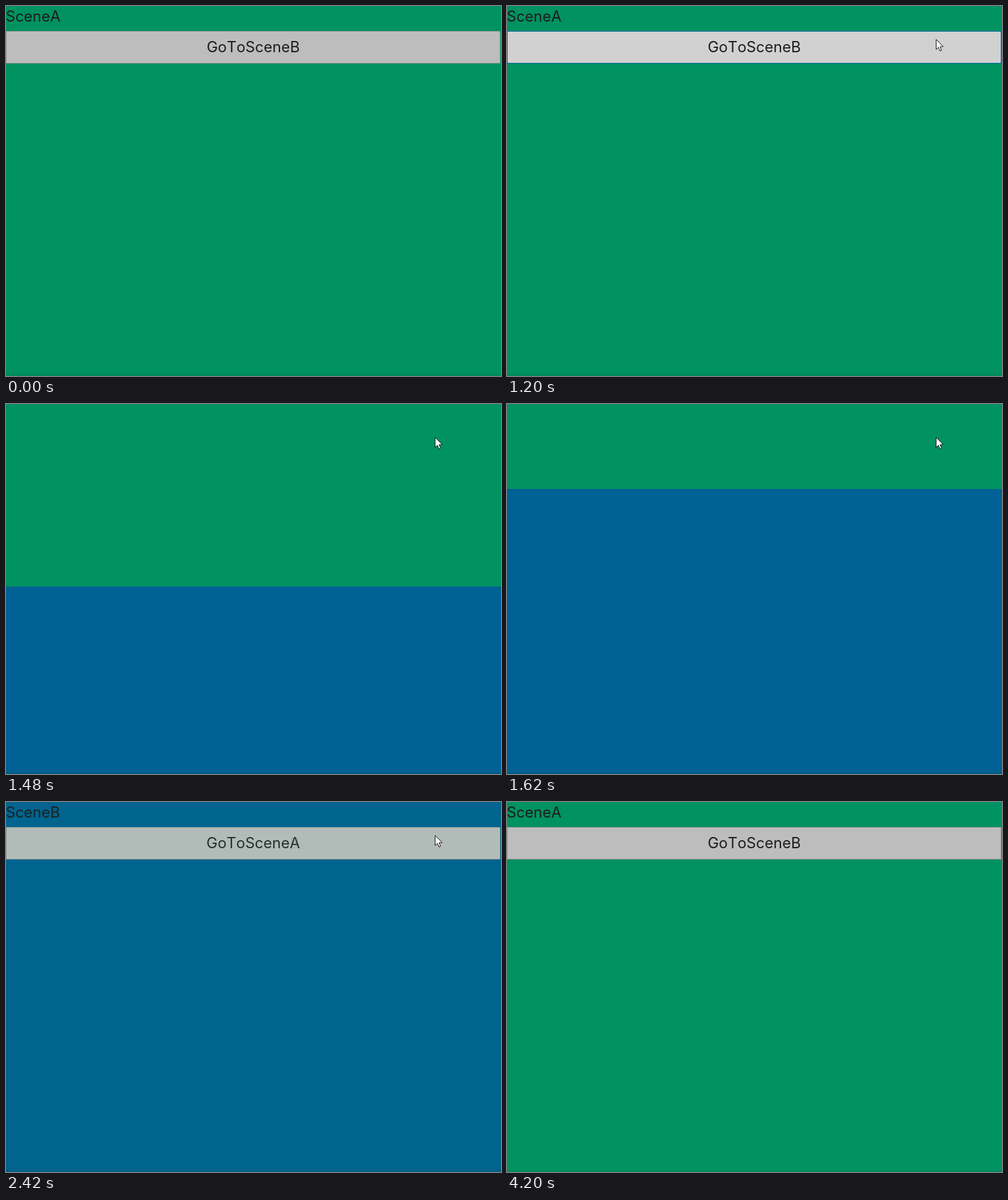
An HTML page with a canvas for the animation above (4.53 s loop, 793 by 592 pixels).

```html
<!DOCTYPE html>
<html lang="en">
<head>
<meta charset="utf-8">
<title>Scene transitions</title>
<style>
  html, body { margin: 0; width: 100%; height: 100%; overflow: hidden; }
  canvas { display: block; }
</style>
</head>
<body>
<canvas id="stage" width="793" height="592"></canvas>
<script>
const W = 793, H = 592, LOOP = 4530, STEP = 70;
const ctx = document.getElementById('stage').getContext('2d');

const scenes = {
  A: { color: '#009260', title: 'SceneA', action: 'GoToSceneB' },
  B: { color: '#006194', title: 'SceneB', action: 'GoToSceneA' }
};
const buttonStyles = {
  idle: ['#bdbdbd', '#929292'],
  hover: ['#d1d1d1', '#777777'],
  pressed: ['#d1d1d1', '#00659c']
};

// Motion advances in discrete steps; returns how many have begun since start.
const steps = (t, start) => Math.floor((t - start) / STEP);
const mix = (a, b, p) => a + (b - a) * p;

function label(text, x, y, align) {
  ctx.font = '24px Inter, sans-serif';
  ctx.fontKerning = 'none';
  ctx.textAlign = align;
  ctx.fillStyle = '#1c1c1c';
  ctx.fillText(text, x, y);
}

function drawScene(name, state, y = 0, alpha = 1) {
  const { color, title, action } = scenes[name];
  const [fill, border] = buttonStyles[state];
  ctx.save();
  ctx.globalAlpha = alpha;
  ctx.translate(0, y);
  ctx.fillStyle = color;
  ctx.fillRect(0, 0, W, H);
  label(title, -0.5, 25, 'left');
  ctx.fillStyle = fill;
  ctx.fillRect(0, 40, 792, 52);
  ctx.strokeStyle = border;
  ctx.lineWidth = 1;
  ctx.strokeRect(0.5, 40.5, 791, 51);
  label(action, 396, 74, 'center');
  ctx.restore();
}

function drawCursor([x, y]) {
  ctx.save();
  ctx.translate(Math.round(x) + 0.5, Math.round(y) + 0.5);
  ctx.beginPath();
  ctx.moveTo(0, 0);
  for (const [px, py] of [[0, 16], [3.7, 12.6], [6.2, 18.4], [8.7, 17.3], [6.3, 11.6], [11.3, 11.4]])
    ctx.lineTo(px, py);
  ctx.closePath();
  ctx.fillStyle = '#fff';
  ctx.fill();
  ctx.strokeStyle = '#111';
  ctx.lineWidth = 1;
  ctx.stroke();
  ctx.restore();
}

function drawClick([x, y]) {
  ctx.fillStyle = 'rgba(255, 0, 0, 0.45)';
  ctx.beginPath();
  ctx.arc(x, y, 15.5, 0, Math.PI * 2);
  ctx.fill();
}

function cursorAt(t) {
  if (t < 110 || t >= 4200) return null;
  if (t < 540) {
    const p = 1 - (1 - steps(t, 110) / 6) ** 2;
    return [mix(751, 687, p), mix(522, 53, p)];
  }
  if (t < 3430) return [687, 53];
  if (t < 3780) return [687, 54];
  const p = ((steps(t, 3780) + 1) / 7) ** 1.5;
  return [mix(687, 750, p), mix(54, 600, p)];
}

function render(t) {
  const cursor = cursorAt(t);
  if (t < 1070) {
    drawScene('A', 'idle');
  } else if (t < 1270) {
    drawScene('A', 'pressed');
  } else if (t < 2290) {
    // A slides up and uncovers B.
    drawScene('B', 'hover');
    const edge = 526 - 78 * steps(t, 1270);
    if (edge > 0) drawScene('A', 'idle', edge - H);
  } else if (t < 2420) {
    drawScene('B', 'pressed');
  } else if (t < 2970) {
    drawScene('B', 'idle');
    drawScene('A', 'hover', 0, 0.08 + 0.115 * steps(t, 2420));
  } else {
    drawScene('A', cursor && cursor[1] < 92 ? 'hover' : 'idle');
  }
  ctx.fillStyle = 'rgba(0, 0, 0, 0.06)';
  ctx.fillRect(0, 589, W, 3);

  if ((t >= 1070 && t < 1200) || (t >= 2290 && t < 2420)) drawClick(cursor);
  if (cursor) drawCursor(cursor);
}

const begin = performance.now();
function tick() {
  render((performance.now() - begin) % LOOP);
  requestAnimationFrame(tick);
}
tick();
</script>
</body>
</html>
```
